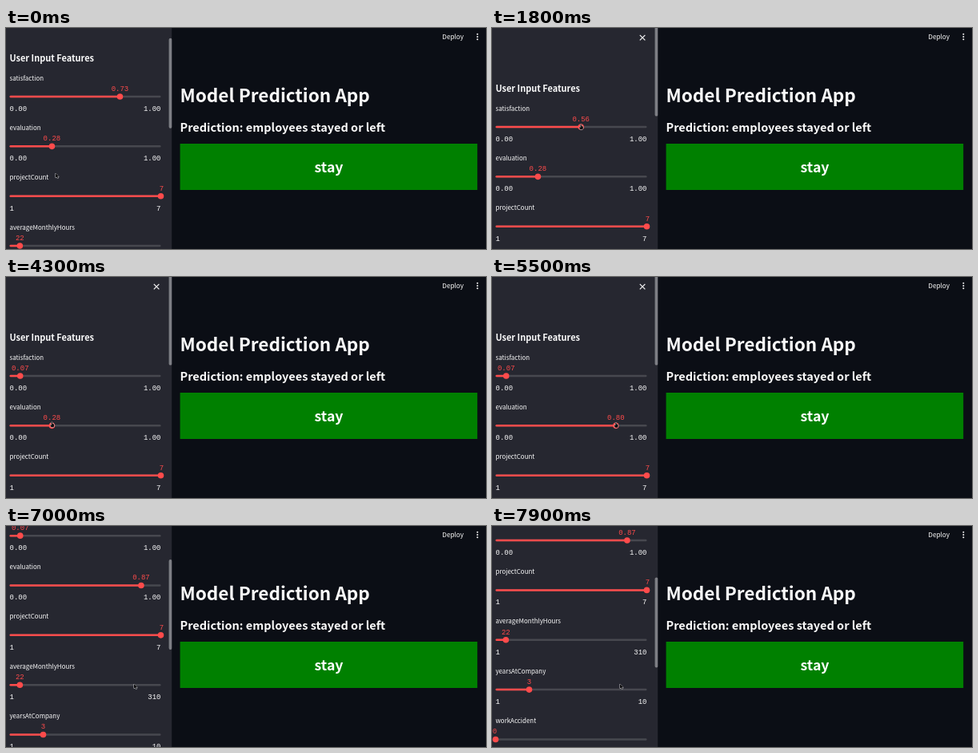
These frames come from a looping animation (600x277 px, 8000 ms). An HTML page with a canvas:

```html
<!DOCTYPE html>
<html lang="en">
<head>
<meta charset="utf-8">
<title>Model Prediction App</title>
<style>
html, body { margin: 0; width: 100%; height: 100%; overflow: hidden; background: #0b0e15; }
canvas { display: block; width: 600px; height: 277px; }
</style>
</head>
<body>
<canvas id="stage"></canvas>
<script>
const W = 600, H = 277, LOOP = 8000, STEP = 100;
const SIDE = 207.5, LEFT = 4.5, SPAN = 189, GAP = 62.35;
const SANS = '"Source Sans Pro", "Noto Sans CJK JP", "Noto Sans CJK SC", "Noto Sans CJK", "Open Sans", sans-serif';
const MONO = '9px "Liberation Mono", monospace';
const RED = '#ff4b4b', WHITE = '#fafafa';

const canvas = document.getElementById('stage');
const ctx = canvas.getContext('2d');
const ratio = window.devicePixelRatio || 1;
canvas.width = W * ratio;
canvas.height = H * ratio;
ctx.scale(ratio, ratio);

// Smooth progress from 0 to 1 between two times
function ease(t, from, to) {
  const k = Math.min(1, Math.max(0, (t - from) / (to - from)));
  return k * k * (3 - 2 * k);
}

const dragOne = t => ease(t, 1300, 2830);
const dragTwo = t => ease(t, 4800, 5700);
const scrollAt = t => 38 * (1 - ease(t, 0, 900)) + 152.4 * ease(t, 6355, 7330) + 15.9 * ease(t, 7650, 7900);

function pointerAt(t) {
  const legs = [
    [ease(t, 400, 1000), 138, 130],
    [ease(t, 1000, 1300), 142.5, 123.5],
    [dragOne(t), 17.7, 123.5],
    [ease(t, 3200, 3850), 57.5, 184.5],
    [dragTwo(t), 169, 185],
    [ease(t, 6000, 6400), 160, 198]
  ];
  let x = 62, y = 182;
  for (const [k, toX, toY] of legs) {
    x += (toX - x) * k;
    y += (toY - y) * k;
  }
  return [x, y];
}

function text(str, x, y, font, color = WHITE, align = 'left') {
  ctx.font = font;
  ctx.fillStyle = color;
  ctx.textAlign = align;
  ctx.fillText(str, x, y);
}

function bar(x, y, w, h, color) {
  ctx.fillStyle = color;
  ctx.beginPath();
  ctx.roundRect(x, y, w, h, Math.min(w, h) / 2);
  ctx.fill();
}

function dot(x, y, r, color) {
  ctx.fillStyle = color;
  ctx.beginPath();
  ctx.arc(x, y, r, 0, Math.PI * 2);
  ctx.fill();
}

function slider(row, name, min, max, value, digits = 0) {
  const y = 124 + row * GAP;
  const part = (value - min) / (max - min);
  const x = LEFT + SPAN * part;
  const nudge = part === 1 ? 1 : part === 0 ? -1 : 0;
  text(name, LEFT, y - 20.4, `7.95px ${SANS}`);
  text(value.toFixed(digits), x + nudge, y - 7.2, MONO, RED, 'center');
  bar(LEFT, y - 1.25, SPAN, 2.5, '#47484f');
  bar(LEFT, y - 1.25, x - LEFT, 2.5, RED);
  dot(x, y, 3.8, RED);
  text(min.toFixed(digits), LEFT, y + 17.8, MONO);
  text(max.toFixed(digits), LEFT + SPAN, y + 17.8, MONO, WHITE, 'right');
}

function cross(x, y, r) {
  ctx.strokeStyle = WHITE;
  ctx.lineWidth = 1.2;
  ctx.beginPath();
  for (const s of [-1, 1]) {
    ctx.moveTo(x - r, y - r * s);
    ctx.lineTo(x + r, y + r * s);
  }
  ctx.stroke();
}

function sidebar(t) {
  const scroll = scrollAt(t);
  ctx.save();
  ctx.beginPath();
  ctx.rect(0, 0, SIDE, H);
  ctx.clip();
  ctx.fillStyle = '#262730';
  ctx.fillRect(0, 0, SIDE, H);
  ctx.save();
  ctx.translate(0, -scroll);
  cross(188.1, 12.1, 3.3);
  text('User Input Features', LEFT, 79.8, `700 10.95px ${SANS}`);
  slider(0, 'satisfaction', 0, 1, 0.73 - 0.66 * dragOne(t), 2);
  slider(1, 'evaluation', 0, 1, 0.28 + 0.59 * dragTwo(t), 2);
  slider(2, 'projectCount', 1, 7, 7);
  slider(3, 'averageMonthlyHours', 1, 310, 22);
  slider(4, 'yearsAtCompany', 1, 10, 3);
  slider(5, 'workAccident', 0, 1, 0);
  ctx.restore();
  bar(203.6, -2.4 + scroll * 0.397, 3.9, 113, '#7d7e84');
  ctx.restore();
}

function mainPanel() {
  ctx.fillStyle = '#0b0e15';
  ctx.fillRect(0, 0, W, H);
  text('Deploy', 545.3, 14.2, `8.2px ${SANS}`);
  for (const y of [7.8, 11, 14.2]) dot(589.3, y, 1, WHITE);
  text('Model Prediction App', 217.5, 93, `600 22.55px ${SANS}`);
  text('Prediction: employees stayed or left', 217.5, 130.4, `700 14.5px ${SANS}`);
  ctx.fillStyle = '#008000';
  ctx.fillRect(217.6, 145, 371.6, 58);
  text('stay', 403.5, 181.4, `700 17.7px ${SANS}`, '#ffffff', 'center');
}

function pointer(t) {
  const [x, y] = pointerAt(t);
  const grab = (t >= 1300 && t <= 3200) || (t >= 3850 && t <= 6000);
  const outline = grab
    ? 'M-.6-2.4H.5L.6-.6 2.6 0V2.6L1.8 3.8H-.8L-2.2 1.4-1.6.7-.6 1.2Z'
    : 'M0 0V5.6L1.4 4.5 2.4 6.6 3.3 6.2 2.4 4.1H4.2Z';
  const shape = new Path2D(outline);
  ctx.save();
  ctx.translate(x, y);
  ctx.lineJoin = 'round';
  ctx.lineWidth = 1;
  ctx.strokeStyle = '#c9c9cc';
  ctx.stroke(shape);
  ctx.fillStyle = '#0c0c0e';
  ctx.fill(shape);
  ctx.restore();
}

function draw(now) {
  const t = Math.floor((now % LOOP) / STEP) * STEP;
  mainPanel();
  sidebar(t);
  pointer(t);
}

const start = performance.now();
function frame() {
  draw(performance.now() - start);
  requestAnimationFrame(frame);
}
draw(0);
requestAnimationFrame(frame);
</script>
</body>
</html>
```
